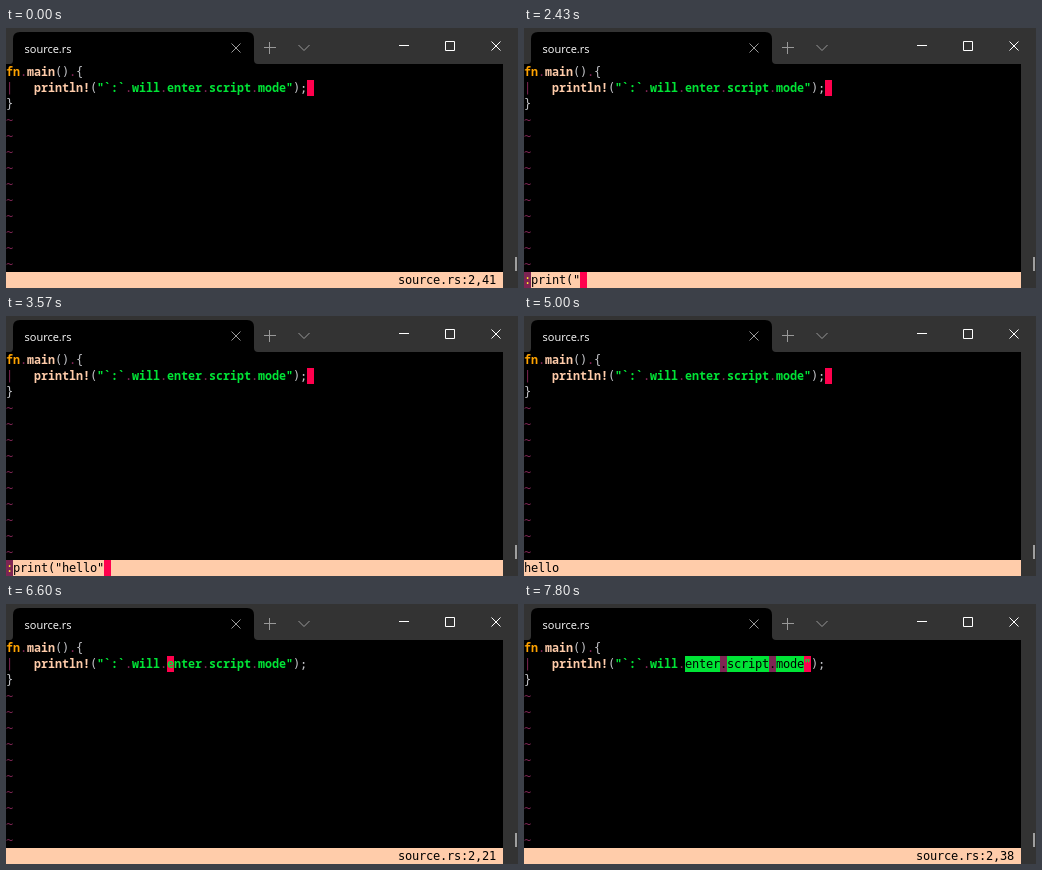
Recreate the animation shown at these times as an HTML page with a canvas. Size 512 px wide and 260 px high, loop 8 s.

```html
<!DOCTYPE html>
<html lang="en">
<head>
<meta charset="utf-8">
<title>Editor script mode</title>
<style>
  html, body { margin: 0; width: 100%; height: 100%; overflow: hidden; background: #000; }
  canvas { display: block; }
</style>
</head>
<body>
<canvas id="stage" width="512" height="260"></canvas>
<script>
const ctx = document.getElementById('stage').getContext('2d');

const LOOP = 8000;
const CELL_W = 7, CELL_H = 16, TOP = 36, STATUS_ROW = 13, WIDTH = 497;
const CHROME = '#333333', BLACK = '#000000', PEACH = '#ffccaa', ORANGE = '#ffa300',
      PURPLE = '#7e2553', GREEN = '#00e436', RED = '#ff004d', GREY = '#c2c3c7', YELLOW = '#ffec27';
const REGULAR = '12px "DejaVu Sans Mono", monospace';
const STRONG = '600 11.67px "Noto Sans Mono", monospace';

const LINES = [
  [['fn', ORANGE], ['.', PURPLE], ['main', PEACH], ['()', GREY], ['.', PURPLE], ['{', GREY]],
  [['|   ', PURPLE], ['println!', PEACH], ['(', GREY],
   ['"`:`.will.enter.script.mode"', GREEN], [');', GREY]],
  [['}', GREY]],
];

const COMMAND = ':print("hello")';
const KEY_TIMES = [500, 870, 970, 1070, 1200, 1370, 1600, 2430,
                   2600, 2700, 2830, 2970, 3100, 3570, 4370];
const RUN = 4930, MOVE_LEFT = 5870, MOVE_RIGHT = 7100, LAST_KEY = 7800;
const LINE_END = 43, WORD_START = 23, WORD_END = 39;

function rect(x, y, w, h, color) {
  ctx.fillStyle = color;
  ctx.fillRect(x, y, w, h);
}

function cell(char, col, row, color, background) {
  const x = col * CELL_W, y = TOP + row * CELL_H;
  if (background) rect(x, y, CELL_W, CELL_H, background);
  ctx.fillStyle = color;
  ctx.fillText(char, x, y + 12);
}

function print(text, col, row, color) {
  [...text].forEach((char, i) => cell(char, col + i, row, color));
}

function stroke(path, color) {
  ctx.strokeStyle = color;
  ctx.stroke(new Path2D(path));
}

function drawWindow() {
  rect(0, 0, 512, 260, BLACK);
  rect(0, 0, 512, TOP, CHROME);
  rect(WIDTH, TOP, 15, 224, CHROME);
  rect(509, 229, 2, 14, '#9f9f9f');

  ctx.fillStyle = BLACK;
  ctx.fill(new Path2D('M4 36Q7 36 7 32V11Q7 4 14 4H241Q248 4 248 11V32Q248 36 252 36Z'));
  ctx.font = '11px "Open Sans", sans-serif';
  ctx.fillStyle = '#ffffff';
  ctx.fillText('source.rs', 18.5, 24.5);

  stroke('M225.5 15.5l9 9m0-9l-9 9', '#999999');
  stroke('M258 19.5h12M263.5 14v12', '#999999');
  stroke('M292.5 17l5.5 5.5l5.5-5.5', '#999999');
  stroke('M393 17.5h10M439.5 13.5h9v9h-9zM485.5 13.5l9 9m0-9l-9 9', '#ffffff');
}

function cursorColumn(t) {
  if (t < MOVE_LEFT) return LINE_END;
  if (t < MOVE_RIGHT)
    return Math.max(WORD_START, LINE_END - 1 - Math.floor((t - MOVE_LEFT) / 38.4));
  if (t >= LAST_KEY) return WORD_END + 1;
  return Math.min(WORD_END, WORD_START + 1 + Math.floor((t - MOVE_RIGHT) / 33.3));
}

function drawText(cursor, selecting) {
  LINES.forEach((line, row) => {
    let col = 0;
    for (const [text, color] of line) {
      for (const char of text) {
        const ink = char === '.' ? PURPLE : color;
        const selected = selecting && row === 1 && col >= WORD_START && col < cursor;
        ctx.font = ink === GREY || ink === PURPLE || selected ? REGULAR : STRONG;
        if (row === 1 && col === cursor) cell(char, col, row, ink, RED);
        else if (selected) cell(char, col, row, BLACK, ink);
        else cell(char, col, row, ink);
        col++;
      }
    }
  });
  ctx.font = REGULAR;
  if (cursor === LINE_END) cell(' ', cursor, 1, RED, RED);
  for (let row = LINES.length; row < STATUS_ROW; row++) cell('~', 0, row, PURPLE);
}

function drawStatus(t, cursor) {
  rect(0, TOP + STATUS_ROW * CELL_H, WIDTH, CELL_H, PEACH);
  if (t < KEY_TIMES[0] || t >= MOVE_LEFT) {
    print(`source.rs:2,${cursor - 2}`, 56, STATUS_ROW, BLACK);
  } else if (t >= RUN) {
    print('hello', 0, STATUS_ROW, BLACK);
  } else {
    const typed = KEY_TIMES.filter(time => time <= t).length;
    print(COMMAND.slice(0, typed), 0, STATUS_ROW, BLACK);
    cell(':', 0, STATUS_ROW, YELLOW, PURPLE);
    cell(' ', typed, STATUS_ROW, RED, RED);
  }
}

function draw(now) {
  const t = now % LOOP;
  const cursor = cursorColumn(t);
  drawWindow();
  drawText(cursor, t >= MOVE_RIGHT);
  drawStatus(t, cursor);
}

const start = performance.now();
function tick() {
  draw(performance.now() - start);
  requestAnimationFrame(tick);
}
tick();
</script>
</body>
</html>
```
